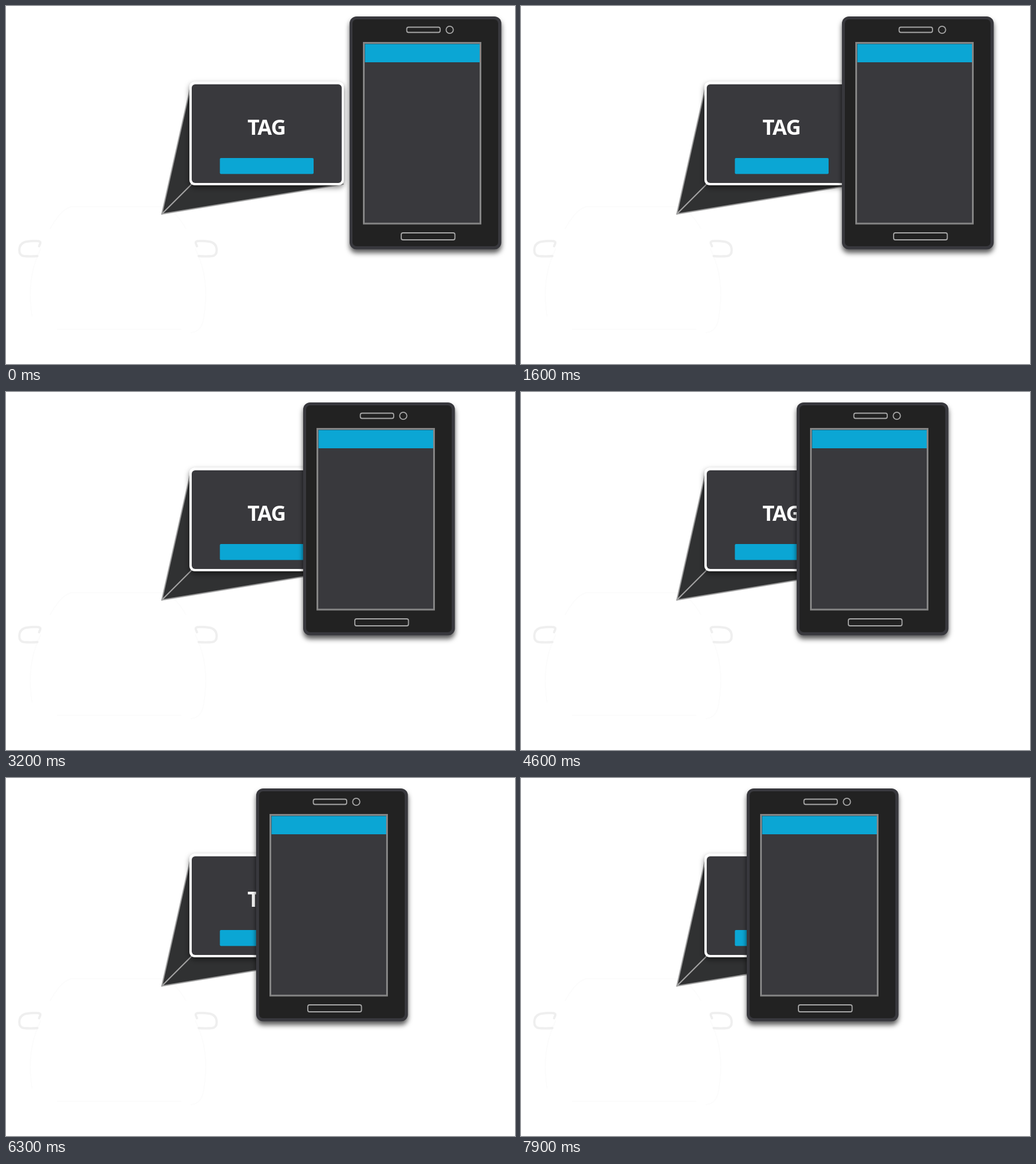
Animation, 877 px wide and 617 px high, one loop 8000 ms. Source, as an HTML page:

```html
<!DOCTYPE html>
<html lang="en">
<head>
<meta charset="utf-8">
<title>Phone and tag</title>
<style>
  html, body { margin: 0; width: 100%; height: 100%; overflow: hidden; background: #fff; }
  svg { display: block; width: 877px; height: 617px; }
  text { font: 700 36px "Open Sans", "Noto Sans", sans-serif; letter-spacing: -1px; }
</style>
</head>
<body>
<svg viewBox="0 0 877 617">
  <defs>
    <filter id="cardShadow" x="-20%" y="-20%" width="140%" height="140%">
      <feDropShadow dx="0" dy="4" stdDeviation="5" flood-color="#000" flood-opacity=".5"/>
    </filter>
    <filter id="phoneShadow" x="-20%" y="-10%" width="140%" height="120%">
      <feDropShadow dx="0" dy="6" stdDeviation="4" flood-color="#000" flood-opacity=".65"/>
    </filter>
    <g id="mirror" fill="none" stroke="#efefef" stroke-width="4" stroke-linecap="round" stroke-linejoin="round">
      <path d="M57 414 L59 409 Q60 405 53 405 Q44 404.5 36 406 Q23 408 23 421 Q23 430 31 431 Q42 432 54 431"/>
    </g>
  </defs>

  <!-- faint car -->
  <g fill="none" stroke="#fcfcfc" stroke-width="2">
    <path d="M76 384 Q94 351 112 346 H268 Q292 351 310 384"/>
    <path d="M60 418 Q34 470 45 535"/>
    <path d="M326 418 Q352 470 341 535 Q338 562 318 563"/>
    <path d="M88 557 H302"/>
  </g>
  <use href="#mirror"/>
  <use href="#mirror" transform="translate(386 0) scale(-1 1)"/>

  <!-- pointer behind the card -->
  <g fill="#303132" stroke="#a0a0a0" stroke-width="2" stroke-linejoin="round">
    <path d="M268.5 358.5 L317 143 L321 306 Z"/>
    <path d="M268.5 358.5 L321 306 L581 307 Z"/>
  </g>

  <!-- card -->
  <rect x="316" y="130.5" width="266" height="178.5" rx="9" fill="#fff" filter="url(#cardShadow)"/>
  <rect x="320" y="135" width="258.5" height="170" rx="6" fill="#39393d"/>
  <text x="416" y="222" fill="#fff">TAG</text>
  <rect x="368.5" y="262" width="161.5" height="27.5" rx="2" fill="#0ba6d4"/>

  <!-- phone -->
  <g id="phone">
    <rect x="592" y="18" width="261.5" height="401.5" rx="12" fill="#39393d" filter="url(#phoneShadow)"/>
    <rect x="597" y="23" width="251" height="391" rx="7" fill="#222"/>
    <rect x="616.5" y="63.5" width="201" height="311.5" fill="#39393d" stroke="#858585" stroke-width="3"/>
    <rect x="618.5" y="65.5" width="197.5" height="31.5" fill="#0ba6d4"/>
    <g fill="none" stroke="#a8a8a8" stroke-width="1.8">
      <rect x="690.5" y="36.5" width="57.5" height="9" rx="3"/>
      <circle cx="764.5" cy="41" r="6.2"/>
      <rect x="681" y="391" width="92.5" height="12" rx="3"/>
    </g>
  </g>
</svg>
<script>
  const LOOP = 8000, TICK = 100, STRIDE = 2.603, PAUSE = 10;
  const phone = document.getElementById("phone");
  const start = performance.now();

  // One tick of rest at PAUSE, otherwise a steady slide snapped to whole pixels.
  function offset(time) {
    const tick = Math.floor(time / TICK);
    const steps = tick < PAUSE ? tick : tick - 1;
    return -Math.floor(steps * STRIDE);
  }

  function draw(now) {
    const time = Math.max(0, now - start) % LOOP;
    phone.setAttribute("transform", `translate(${offset(time)} 0)`);
    requestAnimationFrame(draw);
  }
  draw(start);
</script>
</body>
</html>
```
